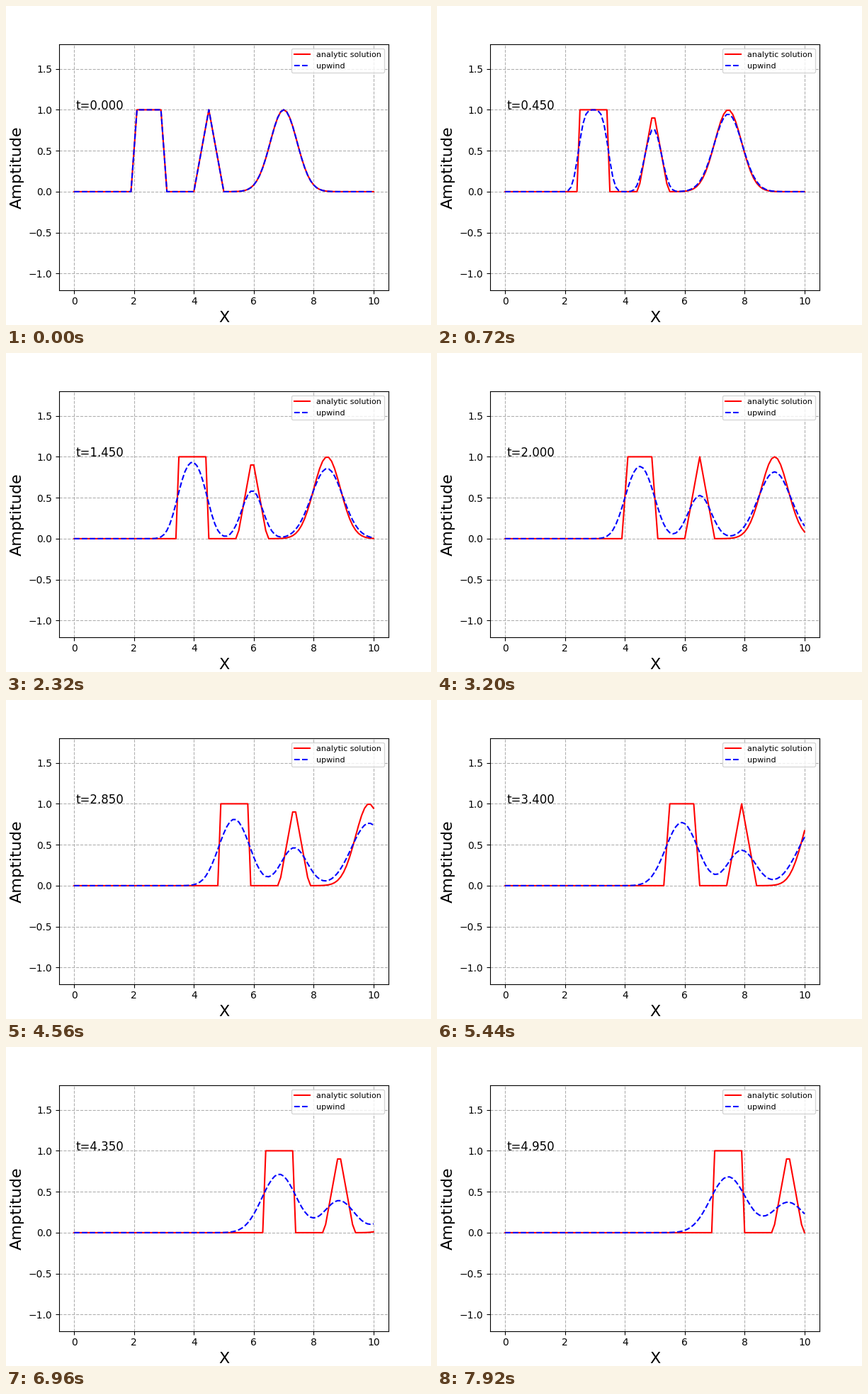
These frames come from a looping animation (600 px wide and 450 px high, 8000 ms). A matplotlib script:

```python
import numpy as np
import matplotlib.pyplot as plt
from matplotlib.animation import FuncAnimation

FRAMES, INTERVAL = 100, 80
DX, DT, SPEED = 0.1, 0.05, 1.0
x = np.linspace(0, 10, 101)


def profile(s):
    """Square pulse, triangle and Gaussian bump side by side."""
    square = 0.5 * (np.sign(s - 2) - np.sign(s - 3))
    triangle = np.maximum(0, 1 - np.abs(s - 4.5) / 0.5)
    bump = np.where(s > 5, np.exp(-2.5 * (s - 7) ** 2), 0)
    return square + triangle + bump


def upwind_history():
    u = profile(x)
    history = [u]
    courant = SPEED * DT / DX
    for _ in range(FRAMES - 1):
        u = u.copy()
        u[1:] -= courant * np.diff(u)
        history.append(u)
    return history


history = upwind_history()

plt.rcParams["font.family"] = "DejaVu Sans"
fig, ax = plt.subplots(figsize=(6, 4.5), dpi=100)
ax.set_xlim(-0.5, 10.5)
ax.set_ylim(-1.2, 1.8)
ax.set_xlabel("X", fontsize=16)
ax.set_ylabel("Amptitude", fontsize=16)
ax.grid(linestyle="--")

exact_line, = ax.plot(x, history[0], "r-", label="analytic solution")
upwind_line, = ax.plot(x, history[0], "b--", label="upwind")
clock = ax.text(0.05, 1.0, "", fontsize=12)
ax.legend(loc="upper right", fontsize=8)


def update(frame):
    t = frame * DT
    exact_line.set_ydata(profile(x - SPEED * t))
    upwind_line.set_ydata(history[frame])
    clock.set_text(f"t={t:.3f}")
    return exact_line, upwind_line, clock


anim = FuncAnimation(fig, update, frames=FRAMES, interval=INTERVAL,
                     repeat=True, repeat_delay=0)
plt.show()
```
